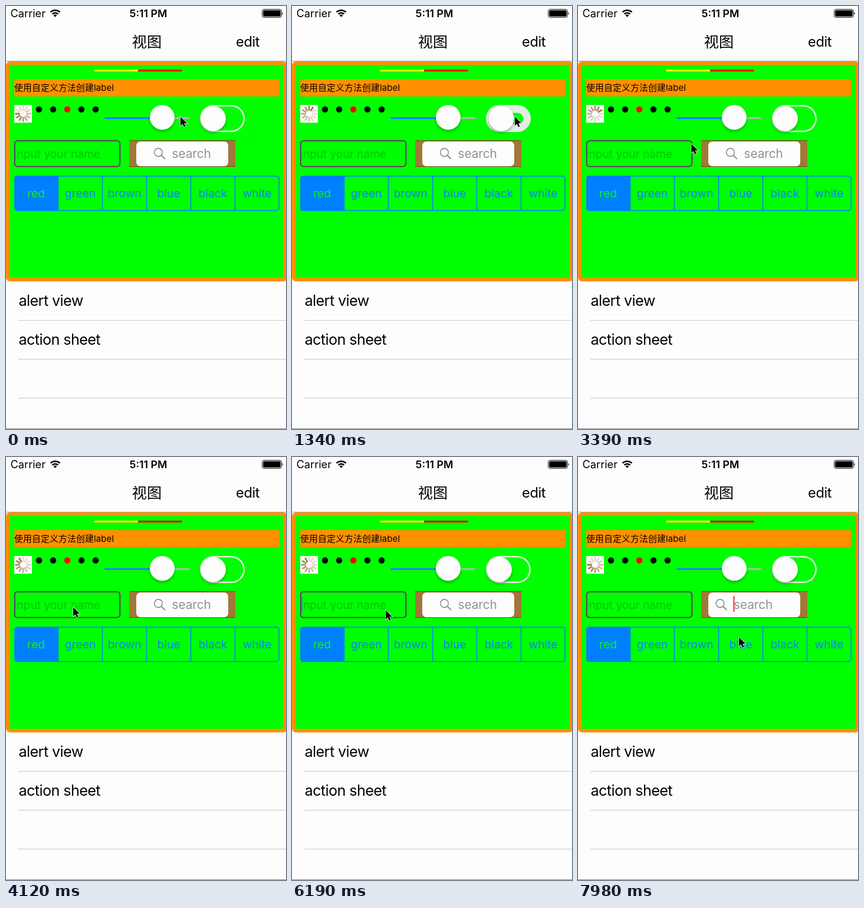
An HTML page that plays this animation: 475 by 718 pixels, repeating every 8000 ms.

```html
<!DOCTYPE html>
<html lang="zh-CN">
<head>
<meta charset="utf-8">
<title>视图</title>
<style>
  html, body { margin: 0; width: 100%; height: 100%; overflow: hidden; background: #fdfdfd; }
  svg { display: block; width: 100%; height: 100%; }
  text { font-family: Inter, "Noto Sans CJK SC", "Noto Sans CJK", sans-serif; white-space: pre; }
  .mid { text-anchor: middle; }
  .row { font-size: 25.2px; letter-spacing: -0.024em; }
  .thumb { fill: #fdfdfd; filter: drop-shadow(0 3px 2.5px rgba(0, 0, 0, .28)); }
</style>
</head>
<body>
<svg viewBox="0 0 475 718">
  <rect width="475" height="718" fill="#fdfdfd"/>

  <!-- status bar -->
  <text x="7.5" y="19" font-size="18.2">Carrier</text>
  <g fill="none" stroke="#000" stroke-width="2.4">
    <path d="M75.5 10.4a11.6 11.6 0 0 1 16 0M78.6 13.7a7.2 7.2 0 0 1 9.8 0"/>
    <path d="M83.5 18.8l-2.9-3a4.2 4.2 0 0 1 5.8 0z" fill="#000" stroke="none"/>
  </g>
  <text class="mid" x="241.5" y="19" font-size="17.8" font-weight="600">5:11 PM</text>
  <rect x="434.7" y="5.7" width="32.6" height="13.6" rx="3" fill="none" stroke="#000"/>
  <rect x="436.2" y="7.2" width="29.6" height="10.6" rx="1.8"/>
  <path d="M468.6 10.2q2.4 2.3 0 4.6z"/>

  <!-- navigation bar -->
  <text class="mid" x="239" y="69.5" font-size="25.2" font-weight="500">视图</text>
  <text id="edit" class="mid" x="410" y="69" font-size="23.7" letter-spacing="-.02em">edit</text>
  <rect y="93" width="475" height="1" fill="#a5a5a5"/>

  <!-- panel -->
  <rect x="3" y="97" width="471" height="367.5" rx="4" fill="#0f0" stroke="#ff9000" stroke-width="6"/>
  <rect x="149" y="108" width="150" height="3.2" rx="1.6" fill="#f00"/>
  <path d="M224 108h-73.4a1.6 1.6 0 0 0 0 3.2h73.4z" fill="#ff0"/>
  <rect x="14" y="124" width="450" height="29.5" fill="#ff9000"/>
  <text x="14" y="143.5" font-size="14.84" letter-spacing=".18">使用自定义方法创建label</text>

  <rect x="14" y="168" width="30" height="30" fill="#fdfdfd"/>
  <g id="spin" stroke="#a07848" stroke-width="2.9" stroke-linecap="round"></g>
  <g id="dots"></g>

  <rect x="167" y="188.7" width="144" height="3" rx="1.5" fill="#b7b7b7"/>
  <rect x="167" y="188.7" width="98" height="3" rx="1.5" fill="#0080ff"/>
  <circle class="thumb" cx="265" cy="189" r="21"/>

  <path id="track" fill-rule="evenodd"/>
  <circle id="knob" class="thumb" cy="191" r="21.3"/>

  <rect x="14.7" y="228.7" width="178.6" height="43.8" rx="5" fill="none" stroke="#800080" stroke-width="1.5"/>
  <text x="14" y="257.5" font-size="19.3" letter-spacing="-.1" fill="#00c706">input your name</text>
  <rect id="caret1" x="14.8" y="238" width="2.6" height="26" fill="#5a5ae0"/>

  <rect x="209" y="228" width="180" height="45" fill="#a07838"/>
  <path d="M209 228.5h180M209 272.5h180" stroke="#7c4420"/>
  <rect x="221" y="230" width="156" height="42" rx="7" fill="#fdfdfd"/>
  <g id="query">
    <g fill="none" stroke="#8e8e93" stroke-width="1.6">
      <circle cx="258.5" cy="248.5" r="6.9"/>
      <path d="M263.5 253.5l6.3 6.2" stroke-width="2"/>
    </g>
    <text x="281.5" y="257.5" font-size="20.8" letter-spacing="-.05" fill="#929296">search</text>
  </g>
  <rect id="caret2" x="263" y="236" width="2.8" height="27" rx="1" fill="#f0645c"/>

  <g id="segs" font-size="19.3"></g>

  <!-- table -->
  <text class="row" x="21.5" y="509">alert view</text>
  <text class="row" x="21.5" y="575">action sheet</text>
  <path d="M21 533.5h454M21 599.5h454M21 665.5h454" stroke="#c8c7cc"/>
  <rect y="717" width="475" height="1" fill="#8c8c8c"/>

  <path id="cursor" d="M0 0v15.2l3.5-3.2 2.4 5.5 2.7-1.2-2.4-5.3h4.8z" stroke="#fff" stroke-width="1.3" paint-order="stroke"/>
</svg>
<script>
const LOOP = 8000, STEP = 147.5;
const $ = id => document.getElementById(id);

function add(parent, tag, attrs, label) {
  const el = document.createElementNS("http://www.w3.org/2000/svg", tag);
  for (const k in attrs) el.setAttribute(k, attrs[k]);
  if (label) el.textContent = label;
  return parent.appendChild(el);
}

const clamp = v => Math.max(0, Math.min(1, v));
const smooth = (t, a, b) => { const u = clamp((t - a) / (b - a)); return u * u * (3 - 2 * u); };
const mix = (a, b, u) => a + (b - a) * u;
const mixColor = (a, b, u) => `rgb(${a.map((v, i) => Math.round(mix(v, b[i], u)))})`;

// static repeats
for (let i = 0; i < 5; i++)
  add($("dots"), "circle", { cx: 56 + 24 * i, cy: 175.5, r: 5.2, fill: i === 2 ? "#f00" : "#000" });

const spokes = Array.from({ length: 12 }, (_, i) =>
  add($("spin"), "path", { d: "M29 176.5v-6", transform: `rotate(${i * 30} 29 183)` }));

const segs = $("segs");
add(segs, "path", { d: "M89 288h-70a5 5 0 0 0-5 5v50a5 5 0 0 0 5 5h70z", fill: "#0080ff" });
add(segs, "rect", { x: 14.7, y: 288.7, width: 448.6, height: 58.6, rx: 5, fill: "none", stroke: "#0080ff", "stroke-width": 1.5 });
["red", "green", "brown", "blue", "black", "white"].forEach((name, i) => {
  const x = 14 + 75 * i;
  if (i) add(segs, "path", { d: `M${x - .5} 288v60`, stroke: "#0080ff", "stroke-width": 1.5 });
  add(segs, "text", { class: "mid", x: x + 37, y: 325, fill: i ? "#0488e8" : "#10f020" }, name);
});

// pointer stops: time, x, y
const stops = [
  [0, 296, 188], [520, 362, 190], [900, 372, 189], [1250, 378, 188], [1480, 378, 188],
  [2070, 416, 60], [2500, 416, 58], [2950, 416, 58], [3540, 151, 267], [3690, 135, 274],
  [4120, 114, 255], [4700, 111, 252], [5950, 111, 252], [6450, 210, 269],
  [7000, 313, 258], [7300, 313, 258], [7900, 273, 306]
];

function pointer(t) {
  const i = stops.findIndex(s => s[0] > t);
  if (i < 0) return stops[stops.length - 1].slice(1);
  const a = stops[i - 1], b = stops[i], u = smooth(t, a[0], b[0]);
  return [mix(a[1], b[1], u), mix(a[2], b[2], u)];
}

function capsule(x, y, w, h) {
  const r = h / 2;
  return `M${x + r} ${y}h${w - h}a${r} ${r} 0 0 1 0 ${h}h${h - w}a${r} ${r} 0 0 1 0 ${-h}z`;
}

function drawSwitch(t) {
  const on = smooth(t, 620, 860) - smooth(t, 1130, 1380);
  const hole = 1 - smooth(t, 560, 740) + smooth(t, 1190, 1480);
  const cx = 384, cy = 191;
  let d = capsule(329, 168, 76, 46);
  if (hole > .01) d += capsule(cx - 52.5 * hole, cy - 20.5 * hole, 71 * hole, 41 * hole);
  $("track").setAttribute("d", d);
  $("track").setAttribute("fill", mixColor([229, 236, 229], [76, 217, 100], clamp(on * 1.3 - .25)));
  $("knob").setAttribute("cx", 351.6 + 31 * on);
}

function render(t) {
  const head = Math.floor(((t - 1327.5) / 1000 + 8) * 12 + 1.5);
  spokes.forEach((s, i) => {
    const age = (head - i + 120) % 12;
    s.setAttribute("opacity", Math.max(.25, 1 - age * .09));
  });

  drawSwitch(t);

  const done = t > 2200 && t < 2900;
  $("edit").textContent = done ? "done" : "edit";
  $("edit").setAttribute("fill", done ? "#ff8c00" : "#000");

  const blink = (t - 4650) % 1000 < 700;
  $("caret1").setAttribute("opacity", t > 4650 && t < 7300 && blink ? 1 : 0);
  $("query").setAttribute("transform", `translate(${-17.5 * smooth(t, 7280, 7640)} 0)`);
  $("caret2").setAttribute("opacity", t > 7500 ? 1 : 0);

  const [x, y] = pointer(t);
  $("cursor").setAttribute("transform", `translate(${x} ${y})`);
}

function tick() {
  const t = performance.now() % LOOP;
  render(Math.floor(t / 147.1) * STEP);
  requestAnimationFrame(tick);
}
tick();
</script>
</body>
</html>
```
